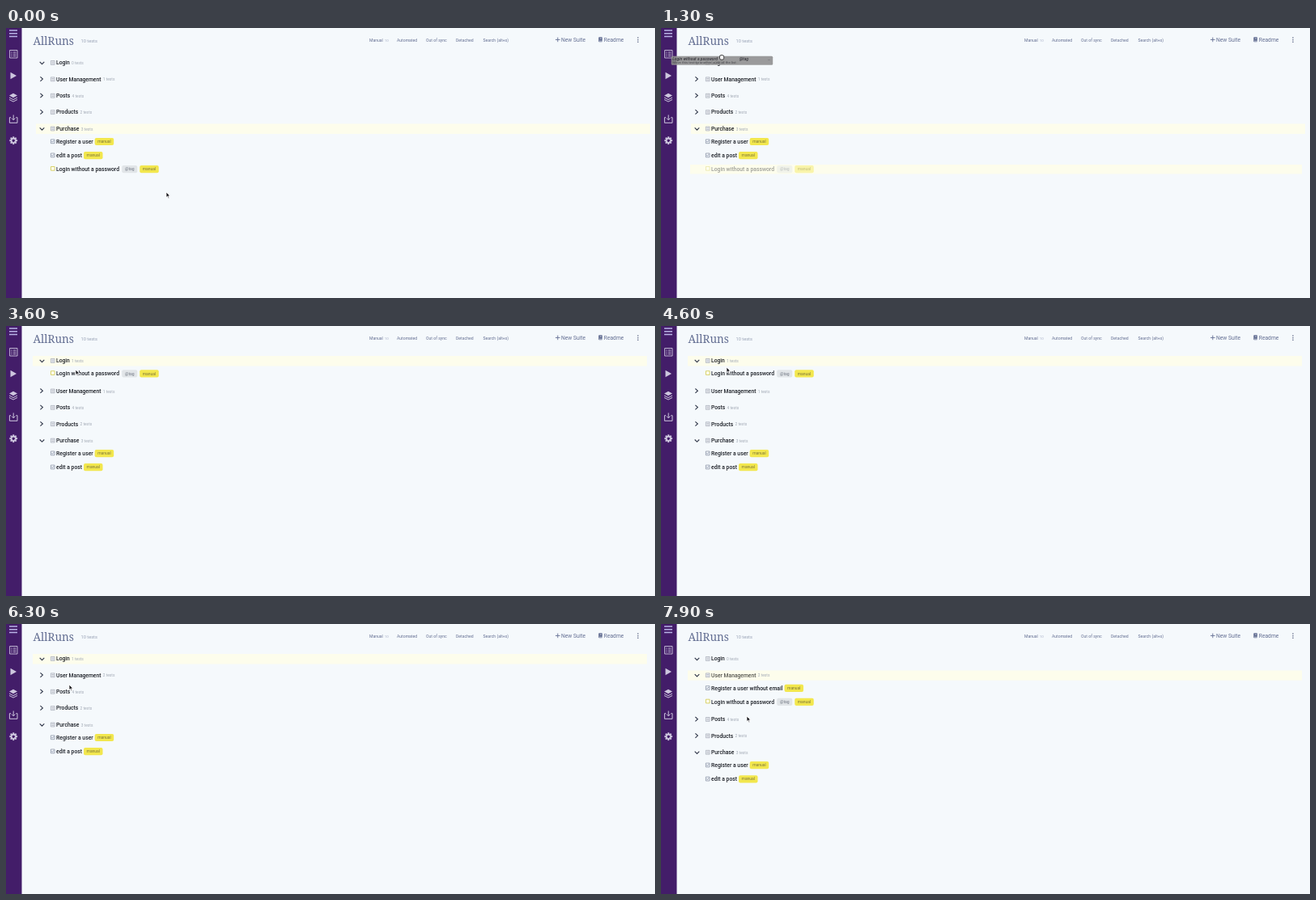
Recreate the animation shown at these times as an HTML page with a canvas. Size 802 by 334 pixels, loop 8000 ms.

```html
<!DOCTYPE html>
<html>
<head>
<meta charset="utf-8">
<style>
html, body { margin: 0; width: 802px; height: 334px; overflow: hidden; background: #f5f9fc; }
canvas { display: block; width: 802px; height: 334px; }
</style>
</head>
<body>
<canvas id="stage"></canvas>
<script>
const canvas = document.getElementById('stage');
const dpr = window.devicePixelRatio || 1;
canvas.width = 802 * dpr;
canvas.height = 334 * dpr;
const c = canvas.getContext('2d');
c.scale(dpr, dpr);

const SANS = 'Roboto, "Open Sans", sans-serif';
const PAGE = '#f5f9fc', YELLOW = '#fdfdec', BLUE = '#e4edf9', INK = '#1d2027', NAVY = '#636e92';

// Moments at which the list changes
const GRAB1 = 800, DROP1 = 2200, MOVED1 = 3000;
const GRAB2 = 5200, DROP2 = 5900, MOVED2 = 6200, HOVER = 6600, OPENED = 7500;

// Pointer tip: time, x, y
const path = [
  [0, 198, 203], [600, 80, 174], [800, 80, 174], [1300, 75, 36.2], [1700, 64, 41],
  [2100, 64, 41], [2500, 83, 50], [2900, 83, 50], [3600, 86, 54], [4600, 81, 51],
  [4800, 81, 51], [5100, 65, 57], [5200, 65, 57], [5700, 85, 84], [5900, 85, 82],
  [6300, 78, 75], [7000, 39.3, 65], [7500, 41, 64.5], [7900, 106, 114]
];

function pointer(t) {
  const i = path.findIndex(p => p[0] >= t);
  if (i < 1) return path[0].slice(1);
  const [t0, x0, y0] = path[i - 1], [t1, x1, y1] = path[i];
  const u = (t - t0) / (t1 - t0), e = u * u * (3 - 2 * u);
  return [x0 + (x1 - x0) * e, y0 + (y1 - y0) * e];
}

function text(s, x, y, size, color, weight = 400, family = SANS) {
  c.font = `${weight} ${size}px ${family}`;
  c.fillStyle = color;
  c.fillText(s, x, y);
  return x + c.measureText(s).width;
}

function box(x, y, w, h, color, r = 0) {
  c.fillStyle = color;
  c.beginPath();
  c.roundRect(x, y, w, h, r);
  c.fill();
}

function draw(d, color, width, fill) {
  const p = new Path2D(d);
  if (fill) { c.fillStyle = fill; c.fill(p); }
  if (width) { c.strokeStyle = color; c.lineWidth = width; c.stroke(p); }
}

function at(x, y, fn) {
  c.save();
  c.translate(x, y);
  fn();
  c.restore();
}

function sidebar() {
  box(0, 0, 19.5, 334, '#431d69');
  const ink = '#cdc6de';
  draw('M4 3H14M4 6.8H14M4 10.6H14', '#b9b4e6', 1.5);
  draw('M4.6 27.5H14V37H4.6ZM6.3 30H7.6M6.3 32.3H7.6M6.3 34.6H7.6M8.8 30H12.4M8.8 32.3H12.4M8.8 34.6H12.4', ink, 0.9);
  draw('M5.5 54.8L13 59L5.5 63.2Z', ink, 0, ink);
  draw('M9 80.8L14 83.5L9 86.2L4 83.5Z', ink, 0, ink);
  draw('M4 86L9 88.6L14 86M4 88.5L9 91.1L14 88.5', ink, 1);
  draw('M6 110.7H4.4V117.3H14V110.7H12.4M9.2 107.5V113.6M7 111.6L9.2 113.8L11.4 111.6', ink, 1);
  at(9.2, 139.2, () => {
    for (let i = 0; i < 8; i++) {
      c.rotate(Math.PI / 4);
      box(-1, -4.9, 2, 3, ink);
    }
    c.beginPath();
    c.arc(0, 0, 2.7, 0, 7);
    c.strokeStyle = ink;
    c.lineWidth = 1.8;
    c.stroke();
  });
}

function header() {
  text('AllRuns', 33.5, 20.5, 13.6, NAVY, 500, '"Noto Serif", serif');
  text('10 tests', 92.5, 17.7, 5.7, '#98a1b5');
  const end = text('Manual', 449, 16.8, 5.1, NAVY);
  text('10', end + 2, 16.8, 4.4, '#a9b3c8');
  text('Automated', 483, 16.8, 5.1, NAVY);
  text('Out of sync', 519, 16.8, 5.1, NAVY);
  text('Detached', 556, 16.8, 5.1, NAVY);
  text('Search (alt+s)', 589.5, 16.8, 5.1, NAVY);
  draw('M679 14.4H684.6M681.8 11.6V17.2', NAVY, 0.9);
  text('New Suite', 686, 16.9, 6.7, NAVY);
  box(732.3, 11.3, 4.6, 6, NAVY, 0.7);
  draw('M734 13H736M733 16.2H737', PAGE, 0.6);
  text('Readme', 738.8, 16.9, 6.7, NAVY);
  for (const y of [12, 14.6, 17.2]) box(780.2, y - 0.7, 1.5, 1.5, '#4c5678', 0.8);
}

function chip(s, x, y, w, back, ink) {
  box(x, y - 4.6, w, 9.2, back, 2);
  c.textAlign = 'center';
  text(s, x + w / 2, y + 1.6, 5, ink);
  c.textAlign = 'left';
  return x + w;
}

function suite(name, count, y, open, back, ink) {
  const right = name === 'Purchase' ? 796 : 792;
  if (back) box(right - 759, y - 6, 759, 12.4, back);
  draw(open ? `M41.7 ${y - 1.2}L44.5 ${y + 1.6}L47.3 ${y - 1.2}`
            : `M42.4 ${y - 3}L45.4 ${y - 0.3}L42.4 ${y + 2.4}`, '#30374a', 1.1);
  draw(`M55.4 ${y - 2.5}h4.7v4.9h-4.7ZM56.5 ${y - 0.9}h2.6M56.5 ${y + 0.8}h2.6`, '#979da9', 0.6, '#eef1f5');
  const end = text(name, 62, y + 2.2, 6.75, ink, 500);
  text(count + ' tests', end + 2.2, y + 2, 4.9, '#a2a9b5');
}

function test(name, y, dragged) {
  const tagged = name === 'Login without a password';
  if (tagged && dragged) box(36, y - 5.8, 756, 11.6, YELLOW);
  c.globalAlpha = tagged && dragged === 2 ? 0.42 : 1;
  if (tagged) {
    draw(`M55.5 ${y - 3.2}h4.6v4.7h-4.6Z`, '#d0c84a', 0.8, '#fffef2');
  } else {
    draw(`M55.4 ${y - 2.6}h4.6v4.8h-4.6Z`, '#7f889c', 0.7);
    draw(`M56.4 ${y - 0.3}l1 1l1.7 -2`, '#5d6988', 0.7);
  }
  let x = text(name, 62, y + 2.2, 6.8, INK, 500) + 2;
  if (tagged) x = chip('@tag', x + 1.2, y, 19, '#e1e5e8', '#727985') + 3;
  chip('manual', x, y, 23.5, '#f2e74e', '#7d763a');
  c.globalAlpha = 1;
}

function list(t, py, dragging) {
  const dragged = dragging ? 2 : t >= 500 && t < GRAB1 || t >= 4900 && t < GRAB2 ? 1 : 0;
  const owner = t < MOVED1 ? 4 : t < MOVED2 ? 0 : 1;
  const suites = [
    ['Login', owner === 0 || t >= MOVED2 && t < OPENED ? 1 : 0, true, []],
    ['User Management', owner === 1 ? 2 : 1, t >= OPENED, ['Register a user without email']],
    ['Posts', 4, false, []],
    ['Products', 2, false, []],
    ['Purchase', 3, true, ['Register a user', 'edit a post']]
  ];
  suites[owner][3].push('Login without a password');
  const marked = [t >= DROP1 && t < OPENED, t >= HOVER, false, false, t < MOVED1];
  let y = 43;
  suites.forEach(([name, count, open, tests], i) => {
    const target = dragging && Math.abs(py - y) < 6.4;
    const ink = i === 1 && t >= HOVER ? '#55554f' : INK;
    suite(name, count, y, open, target ? BLUE : marked[i] && YELLOW, ink);
    if (open) tests.forEach((s, k) => test(s, y + 15.9 + 17.1 * k, dragged));
    y += 20.4 + (open ? 17.1 * tests.length : 0);
  });
}

function ghost(x, y) {
  box(x, y, 125.5, 11, 'rgba(145,145,145,.9)', 1.5);
  text('Login without a password', x + 1.5, y + 5.2, 5, '#34343a', 'italic 500');
  text('@tag', x + 84, y + 5.2, 5, '#34343a', 'italic 500');
  text('Move this test to another suite of the list', x + 1.5, y + 9.4, 4.4, '#4b4b50');
  text('…', x + 119, y + 5.5, 5, '#4b4b50');
}

function cursor(x, y, kind) {
  at(x, y, () => {
    c.lineJoin = 'round';
    if (kind === 'arrow') {
      draw('M0 0V6.6L1.6 5.2L2.7 7.7L3.8 7.2L2.7 4.8H4.8Z', '#fff', 0.8, '#15151a');
    } else if (kind === 'hand') {
      draw('M0 .8Q.8 -.4 1.5 .8V3.2L4.2 3.8Q5 4 4.8 5.2L4 8.6H.4L-2 5.4Q-2 4 0 5.3Z', '#3a3a40', 0.8, '#fff');
    } else {
      draw('M-2.4 -1Q-2.6 -2.6 -1 -2.4Q0 -3.2 1 -2.4Q2.8 -2.6 2.7 -.8V1.2L1.8 3H-1.4L-2.6 1Z', '#333', 0.9, '#f4f4f4');
    }
  });
}

function frame() {
  const t = Math.floor(performance.now() % 8000 / 100) * 100;
  const [x, y] = pointer(t);
  const dragging = t >= GRAB1 && t < DROP1 || t >= GRAB2 && t < DROP2;
  box(0, 0, 802, 334, PAGE);
  header();
  list(t, y, dragging);
  sidebar();
  if (dragging) ghost(x - 62.3, y - 1.5);
  const pointing = t >= DROP1 && t < 3400 || t >= 6400 && t <= OPENED;
  cursor(x, y, dragging ? 'grab' : pointing ? 'hand' : 'arrow');
  requestAnimationFrame(frame);
}
frame();
</script>
</body>
</html>
```
